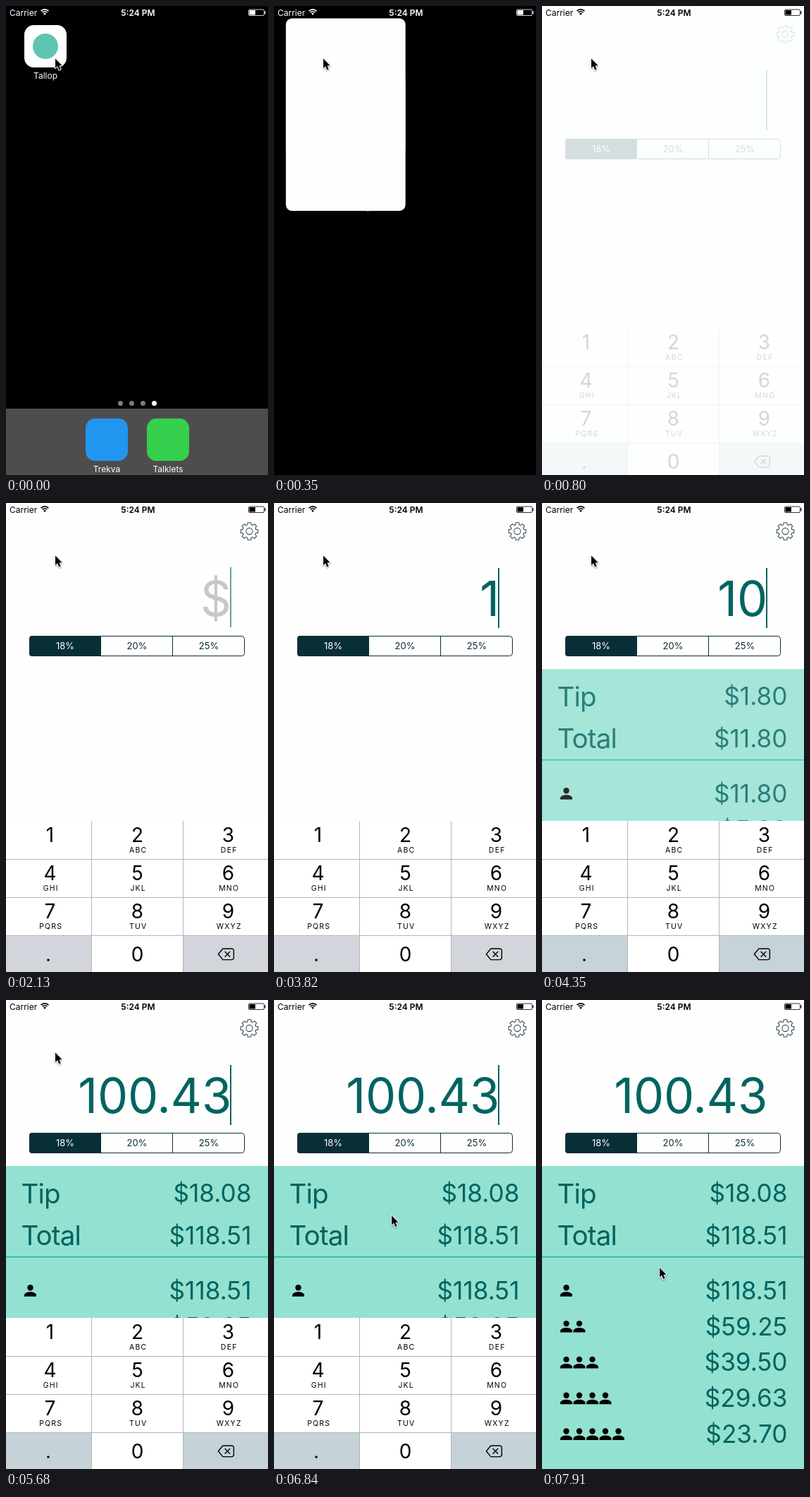
An HTML page with a canvas that plays this animation: 372 px wide and 664 px high, repeating every 8000 ms.

```html
<!DOCTYPE html>
<html lang="en">
<head>
<meta charset="utf-8">
<title>Tip calculator</title>
<style>
  html, body { margin: 0; width: 100%; height: 100%; overflow: hidden; background: #000; }
  canvas { display: block; width: 372px; height: 664px; }
</style>
</head>
<body>
<canvas id="stage" width="372" height="664"></canvas>
<script>
const W = 372, H = 664, LOOP = 8000, TICKS = 90;
const INK = '#00645f', NAVY = '#082e36', LAUNCH = '#fcfffe', RULE = '#b5b5b8', GEAR = '#38525c';
const BILL = '100.43', KEYSTROKES = [43, 49, 51, 56, 61, 64];
const FOCUS = 7, DISMISS = 79, BLINK = 11;
const ctx = document.getElementById('stage').getContext('2d');

const clamp = v => Math.max(0, Math.min(1, v));
const ramp = (k, from, to) => clamp((k - from) / (to - from));
const ease = p => p * p * (3 - 2 * p);
const mix = (a, b, p) => a + (b - a) * p;

function text(str, x, y, size, color, { align = 'center', weight = 400, spacing = 0 } = {}) {
  ctx.font = `${weight} ${size}px Inter, Roboto, sans-serif`;
  ctx.letterSpacing = spacing + 'px';
  ctx.textAlign = align;
  ctx.fillStyle = color;
  ctx.fillText(str, x, y);
}

function rect(x, y, w, h, color) {
  ctx.fillStyle = color;
  ctx.fillRect(x, y, w, h);
}

function tile(x, y, w, h, r, color) {
  ctx.beginPath();
  ctx.roundRect(x, y, w, h, r);
  ctx.fillStyle = color;
  ctx.fill();
}

const icon = (x, y, color) => tile(x, y, 60, 60, 13.5, color);

function disc(x, y, r, color) {
  ctx.beginPath();
  ctx.arc(x, y, r, 0, 2 * Math.PI);
  ctx.fillStyle = color;
  ctx.fill();
}

function polyline(points, close) {
  ctx.beginPath();
  points.forEach(([x, y]) => ctx.lineTo(x, y));
  if (close) ctx.closePath();
}

function stroke(color, width) {
  ctx.strokeStyle = color;
  ctx.lineWidth = width;
  ctx.stroke();
}

function withAlpha(alpha, paint) {
  ctx.save();
  ctx.globalAlpha = alpha;
  paint();
  ctx.restore();
}

function statusBar(color) {
  text('Carrier', 5, 14, 12, color, { align: 'left' });
  text('5:24 PM', 187.5, 14, 12, color, { weight: 600 });
  const from = -Math.PI * .75, to = -Math.PI * .25;
  for (const r of [7.7, 4.8]) {
    ctx.beginPath();
    ctx.arc(55, 12.6, r, from, to);
    stroke(color, 1.7);
  }
  ctx.beginPath();
  ctx.moveTo(55, 13);
  ctx.arc(55, 12.6, 2.7, from, to);
  ctx.fillStyle = color;
  ctx.fill();
  ctx.beginPath();
  ctx.roundRect(344.5, 5, 22, 8.5, 1.5);
  stroke(color, .8);
  rect(345.5, 6, 8.5, 6.5, color);
  rect(367.3, 7.5, 1.2, 3.5, color);
}

function home(pressed) {
  rect(0, 570, W, 94, '#4d4d4d');
  icon(26, 27, '#fff');
  disc(56, 57, 18, '#5fc6b2');
  if (pressed) icon(26, 27, 'rgba(0,0,0,.5)');
  text('Tallop', 56, 103, 12, '#fff');
  for (let i = 0; i < 4; i++) disc(162.5 + 16 * i, 562.5, 3.5, i < 3 ? '#7c7c7c' : '#fff');
  icon(113, 584, '#2196f0');
  icon(200, 584, '#35d04e');
  text('Trekva', 143, 660, 12, '#fff');
  text('Talklets', 230, 660, 12, '#fff');
}

// The home screen zooms into the tapped icon, which opens out into the app.
function launch(k) {
  const p = ease(ramp(k, 2, 7));
  const w = mix(60, W, p), h = mix(60, H, p);
  const cx = mix(56, W / 2, p), cy = mix(57, H / 2, p);
  withAlpha(1 - p, () => {
    ctx.translate(cx, cy);
    ctx.scale(w / 60, w / 60);
    ctx.translate(-56, -57);
    home(false);
  });
  withAlpha(clamp(p * 4), () => tile(cx - w / 2, cy - h / 2, w, h, 13.5 * (1 - p), LAUNCH));
  statusBar(p > .6 ? '#000' : '#fff');
}

function gear() {
  const points = [];
  for (let i = 0; i < 8; i++) {
    const a = i * Math.PI / 4;
    for (const [d, r] of [[-.27, 9.6], [-.19, 12.5], [.19, 12.5], [.27, 9.6]]) {
      points.push([345.5 + r * Math.sin(a + d), 40 - r * Math.cos(a + d)]);
    }
  }
  polyline(points, true);
  stroke(GEAR, 1.1);
  ctx.beginPath();
  ctx.arc(345.5, 40, 4.6, 0, 2 * Math.PI);
  stroke(GEAR, 1.1);
}

function segments() {
  ctx.beginPath();
  ctx.roundRect(33.5, 188.5, 305, 28, 4);
  stroke(NAVY, 1);
  tile(33, 188, 102, 29, [4, 0, 0, 4], NAVY);
  rect(236, 188, 1, 29, NAVY);
  ['18%', '20%', '25%'].forEach((s, i) => text(s, 84 + 102 * i, 207, 13, i ? NAVY : '#fff'));
}

function person(x, y) {
  disc(x + 8.5, y - 4, 4.2, '#000');
  ctx.beginPath();
  ctx.moveTo(x, y + 8.5);
  ctx.lineTo(x, y + 6.3);
  ctx.bezierCurveTo(x, y + 3.4, x + 5.6, y + 2, x + 8.5, y + 2);
  ctx.bezierCurveTo(x + 11.4, y + 2, x + 17, y + 3.4, x + 17, y + 6.3);
  ctx.lineTo(x + 17, y + 8.5);
  ctx.fill();
}

function panel(bill, alpha) {
  const money = (v, y) => text('$' + v.toFixed(2), 348.5, y, 35.2, INK, { align: 'right' });
  const label = (s, y) => text(s, 21.5, y, 38.6, INK, { align: 'left', spacing: -.9 });
  const total = bill * 1.18;
  rect(0, 235, W, H - 235, '#93e1d1');
  label('Tip', 288);
  label('Total', 347);
  money(bill * .18, 286);
  money(total, 346);
  rect(0, 363, W, 1.5, '#1fb0ae');
  for (let n = 1; n <= 5; n++) {
    const y = 411.3 + 50.8 * (n - 1);
    for (let i = 0; i < n; i++) person(26 + 18.5 * i, y);
    money(total / n, y + 12.5);
  }
  withAlpha(1 - alpha, () => rect(0, 235, W, H - 235, '#fff'));
}

function deleteKey(x, y) {
  polyline([[x - 12, y], [x - 5.5, y - 7.8], [x + 8, y - 7.8], [x + 10, y - 6],
    [x + 10, y + 6], [x + 8, y + 7.8], [x - 5.5, y + 7.8]], true);
  stroke('#000', 1.4);
  for (const d of [-3.7, 3.7]) {
    polyline([[x - 2.7, y - d], [x + 4.7, y + d]]);
    stroke('#000', 1.4);
  }
}

function keyboard(drop, tint) {
  const letters = ['', 'ABC', 'DEF', 'GHI', 'JKL', 'MNO', 'PQRS', 'TUV', 'WXYZ'];
  const column = i => 62.5 + 126.5 * i - (i === 1 ? 2.5 : 0);
  ctx.save();
  ctx.translate(0, drop);
  rect(0, 450, W, 214, '#fff');
  for (const [x, w] of [[0, 121], [252, 120]]) {
    rect(x, 612, w, 52, '#d2d5db');
    withAlpha(tint, () => rect(x, 612, w, 52, '#c5d3d9'));
  }
  for (const x of [121, 251]) rect(x, 450, 1, 214, RULE);
  for (const y of [504, 558, 612]) rect(0, y, W, 1, RULE);
  letters.forEach((s, i) => {
    const x = column(i % 3), y = 480 + 54 * Math.floor(i / 3);
    text(i + 1, x, y, 28, '#000');
    text(s, x + 1.2, y + 15, 10.5, '#000', { spacing: 1.2 });
  });
  text('0', column(1), 649, 28, '#000');
  disc(60, 647, 1.8, '#000');
  deleteKey(313.4, 638.8);
  ctx.restore();
}

// Solid for a moment after each keystroke, then blinking.
function caretAlpha(k, since) {
  const age = k - since;
  return age < 6 ? 1 : clamp(3.6 - Math.abs(age % BLINK - 3));
}

function app(k) {
  const strokes = KEYSTROKES.filter(start => k >= start);
  const typed = BILL.slice(0, strokes.length);
  const shown = ramp(k, 44, 50);
  rect(0, 0, W, H, '#fefefe');
  gear();
  if (typed) text(typed, 320, 159.5, 68.5, INK, { align: 'right', spacing: -.2 });
  else withAlpha(ramp(k, 9, 12), () => text('$', 320, 159.5, 68.5, '#c7c7cc', { align: 'right' }));
  if (k <= DISMISS) {
    withAlpha(caretAlpha(k, strokes.pop() ?? FOCUS), () => rect(318, typed ? 92 : 91, 2, 85, INK));
  }
  segments();
  if (shown > 0) panel(Number(typed), shown);
  const rise = 50 * (1 - ramp(k, 7, 11)) ** 3;
  keyboard(rise + 214 * ease(ramp(k, DISMISS, DISMISS + 2)), shown);
  withAlpha(1 - ease(ramp(k, 8, 12)), () => rect(0, 0, W, H, LAUNCH));
  statusBar('#000');
}

function pointer(k) {
  const travel = ease(ramp(k, 71, 77));
  const x = mix(70, 167, travel);
  const y = mix(74.5, 305, travel) + 62 * ramp(k, 84, 87) + 12 * ramp(k, 88, 89);
  ctx.save();
  ctx.translate(x, y);
  polyline([[0, 0], [0, 13.6], [3.1, 10.8], [5.3, 16], [7.7, 15], [5.5, 9.9], [9.6, 9.7]], true);
  ctx.shadowColor = 'rgba(0,0,0,.4)';
  ctx.shadowBlur = 2;
  ctx.shadowOffsetY = 1;
  stroke('#fff', 2);
  ctx.shadowColor = 'transparent';
  ctx.fillStyle = '#000';
  ctx.fill();
  ctx.restore();
}

// Motion advances in even ticks, like a screen recording.
function draw(time) {
  const k = Math.floor((time % LOOP) / LOOP * TICKS + .2) % TICKS;
  ctx.lineJoin = 'round';
  rect(0, 0, W, H, '#000');
  if (k < 3) {
    home(k > 0);
    statusBar('#fff');
  } else if (k < 8) {
    launch(k);
  } else {
    app(k);
  }
  pointer(k);
}

const start = performance.now();
function loop() {
  draw(performance.now() - start);
  requestAnimationFrame(loop);
}
loop();
</script>
</body>
</html>
```
